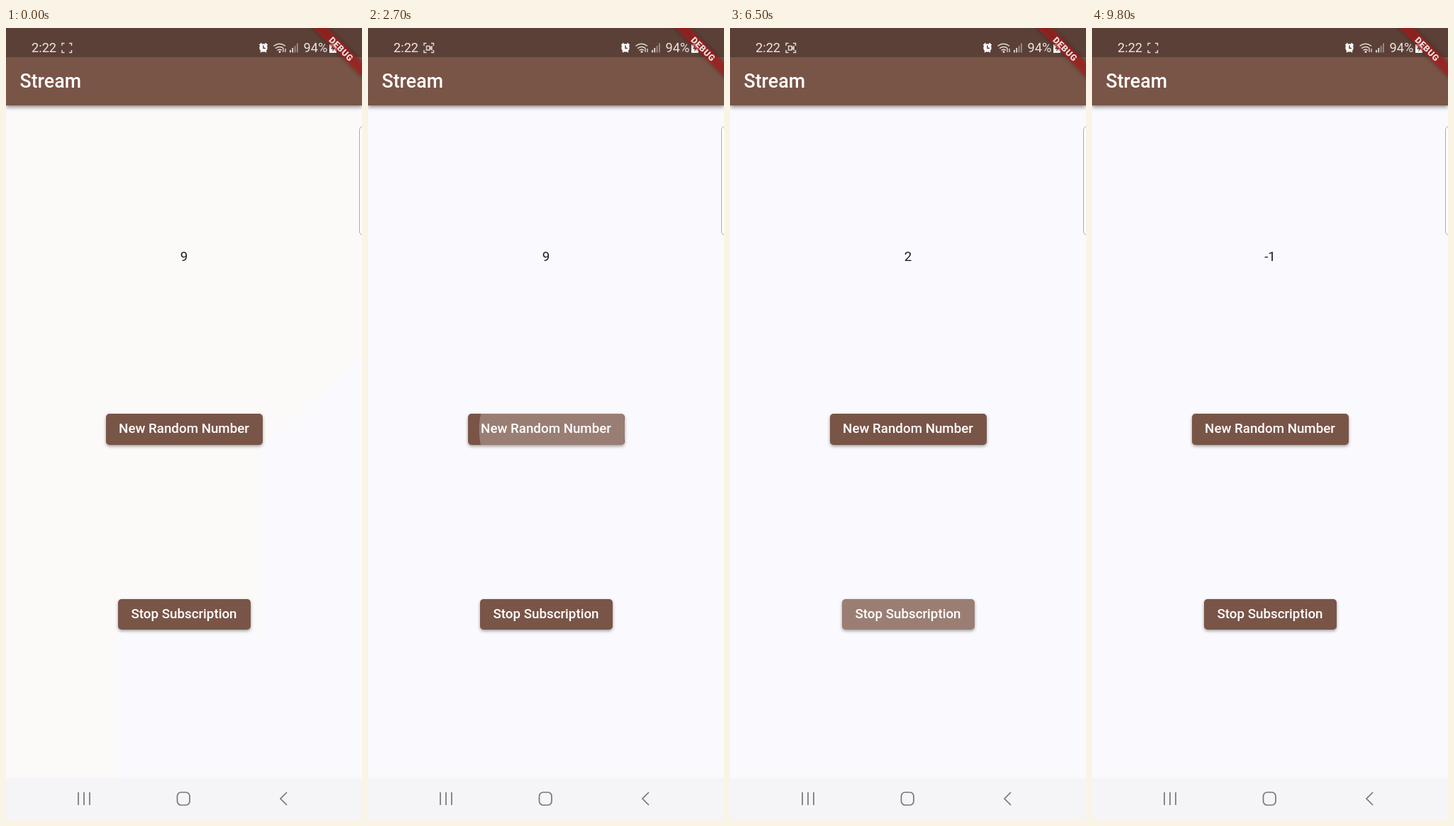
An HTML page for the animation above (9900 ms loop, 502 px wide and 1115 px high).

```html
<!DOCTYPE html>
<html lang="en">
<head>
<meta charset="utf-8">
<title>Stream</title>
<style>
  html, body { margin: 0; width: 100%; height: 100%; overflow: hidden; background: #faf9fd; }
  body { position: relative; font-family: Roboto, sans-serif; }
  svg { position: absolute; left: 0; top: 0; }
  .btn { position: absolute; height: 43.5px; border-radius: 5px; color: #fff; text-align: center;
         font: 500 18.75px/43px Roboto, sans-serif; white-space: nowrap; }
  #bar { position: absolute; left: 0; top: 0; width: 502px; height: 109px; background: #795548;
         box-shadow: 0 2px 6px rgba(0,0,0,.5); }
  #number { position: absolute; left: 0; width: 502px; top: 310px; text-align: center;
            font-size: 18.8px; line-height: 24px; color: #202020; }
</style>
</head>
<body>
<svg width="502" height="1115">
  <path id="warm" d="M0 0H502V460L360 590V850H158V1056H0Z" fill="#fbfaf8"/>
  <rect y="1056" width="502" height="59" fill="#f5f4f6"/>
  <g fill="none" stroke="#777" stroke-width="1.7">
    <path d="M102 1076v18M110 1076v18M118 1076v18M396 1076l-9 9l9 9"/>
    <rect x="241.500" y="1076" width="17.500" height="18" rx="5.500"/>
  </g>
  <rect x="498.500" y="138.500" width="12" height="153" rx="5" fill="#fdfcfe" stroke="#aaa"/>
</svg>
<div id="bar"></div>
<div id="number"></div>
<div class="btn" style="left:140.500px;top:543px;width:221px">New Random Number</div>
<div class="btn" style="left:157.500px;top:803.500px;width:187px">Stop Subscription</div>
<svg width="502" height="112">
  <rect width="502" height="41" fill="#5b4037"/>
  <text x="19.500" y="83.500" font-size="26.800" font-weight="500" fill="#fff">Stream</text>
  <g fill="#eae4e2" font-size="18.200">
    <text x="36" y="34">2:22</text>
    <text x="419.500" y="34">94%</text>
  </g>
  <g fill="none" stroke="#e4dcda" stroke-width="1.400">
    <path d="M79 25v-3.500h3.500M89 21.500h3.500v3.500M92.500 31v3.500h-3.500M82.500 34.500h-3.500v-3.500"/>
    <path id="camera" d="M82.500 25.500h4.500v5.500h-4.500zM87.500 28l2.500-2v4.500z"/>
    <path d="M357.500 24.500l3-3M368.500 24.500l-3-3M359 34l1.500-1.500M367 34l-1.500-1.500" stroke="#fff" stroke-width="1.800"/>
    <path d="M377.500 25.500q8-6.500 16.500 0M380 28.700q6-4.500 11.500 0M382.500 31.500q3.500-2.500 6.500 0"/>
    <path d="M391 34v-5M394 29v5" stroke-width="1.300"/>
  </g>
  <circle cx="363" cy="28" r="5.700" fill="#fff"/>
  <path d="M363 24.500v4h3" fill="none" stroke="#5b4037" stroke-width="1.500"/>
  <circle cx="386" cy="33.500" r="1.500" fill="#e4dcda"/>
  <g fill="#e4dcda">
    <path d="M400 31h1.800v3.500h-1.800zM403.300 28h1.800v6.500h-1.800z"/>
    <path d="M406.700 25h1.800v9.500h-1.800zM410 21.500h1.800v13h-1.800z" opacity=".5"/>
  </g>
  <path d="M459 21.500h4v1.500h3v12h-10v-12h3z" fill="#fff"/>
  <path d="M462 24l-4 5.500h3l-1 4l4-5.500h-3z" fill="#5b4037"/>
  <g transform="translate(502) rotate(45)">
    <rect x="-60" y="34.200" width="120" height="14.600" fill="#b71c1c" fill-opacity=".63"
          style="filter:drop-shadow(0 0 3px rgba(0,0,0,.5))"/>
    <text x=".3" y="46" text-anchor="middle" font-size="12.400" font-weight="900" letter-spacing=".6"
          fill="#f0dfdd">DEBUG</text>
  </g>
</svg>
<script>
const LOOP = 9900;
const $ = id => document.getElementById(id);
const buttons = [...document.querySelectorAll('.btn')].map(el => ({
  el, left: el.offsetLeft + .5, w: parseFloat(el.style.width), h: 43.5
}));

// button, finger down, finger up, finger x, number shown afterwards
const taps = [
  [0, 900, 1000, 310, '7'],
  [0, 2530, 2580, 318, '9'],
  [0, 3900, 4050, 318, '4'],
  [0, 5220, 5300, 315, '3'],
  [0, 5580, 5640, 315, '2'],
  [1, 6200, 6300, 295],
  [1, 7310, 7510, 295],
  [0, 8300, 8420, 310, '-1']
].map(([button, down, up, x, value]) => ({ button, down, up, x, value }));

const clamp = v => Math.max(0, Math.min(1, v));
const mix = (a, b, k) => a + (b - a) * k;

// cubic-bezier(.25, .1, .25, 1)
function ease(x) {
  let lo = 0, hi = 1, s;
  for (let i = 0; i < 24; i++) {
    s = (lo + hi) / 2;
    const bx = .75 * s * (1 - s) + s ** 3;
    if (bx < x) lo = s; else hi = s;
  }
  return .3 * s * (1 - s) ** 2 + 3 * s * s * (1 - s) + s ** 3;
}

const white = a => `rgba(255,255,255,${a.toFixed(4)})`;

function splash(tap, b, t) {
  const since = Math.max(0, t - tap.up);
  const held = Math.min(t, tap.up) - tap.down;
  const grown = ease(clamp(held / 1000 + since / 225));
  const r = mix(.3, 1, grown) * Math.hypot(b.w, b.h) / 2;
  const x = mix(tap.x - b.left, b.w / 2, grown);
  const color = white(.245 * clamp((t - tap.down) / 75) * clamp((375 - since) / 150));
  return `radial-gradient(circle at ${x}px 50%, ${color} ${r - .5}px, transparent ${r + .5}px)`;
}

function press(tap, t) {
  const held = Math.min(t, tap.up) - tap.down;
  return clamp(clamp(held / 200) - Math.max(0, t - tap.up) / 200);
}

function draw(t) {
  $('warm').style.display = t < 300 ? '' : 'none';
  const blink = t % 1000;
  $('camera').style.display = blink >= 290 && blink < 790 ? '' : 'none';

  const last = taps.filter(p => p.value && p.up <= t).pop();
  $('number').textContent = last ? last.value : '9';

  buttons.forEach((b, i) => {
    const live = taps.filter(p => p.button === i && t >= p.down && t < p.up + 375);
    const lift = Math.max(0, ...live.map(p => press(p, t)));
    const glow = white(.245 * lift);
    b.el.style.background =
      [...live.map(p => splash(p, b, t)), `linear-gradient(${glow}, ${glow})`].join() + ' #795548';
    b.el.style.boxShadow = `0 ${2 + 2 * lift}px ${4 + 4 * lift}px rgba(0,0,0,.36)`;
  });
}

const start = performance.now();
function frame() {
  draw((performance.now() - start) % LOOP);
  requestAnimationFrame(frame);
}
frame();
</script>
</body>
</html>
```
